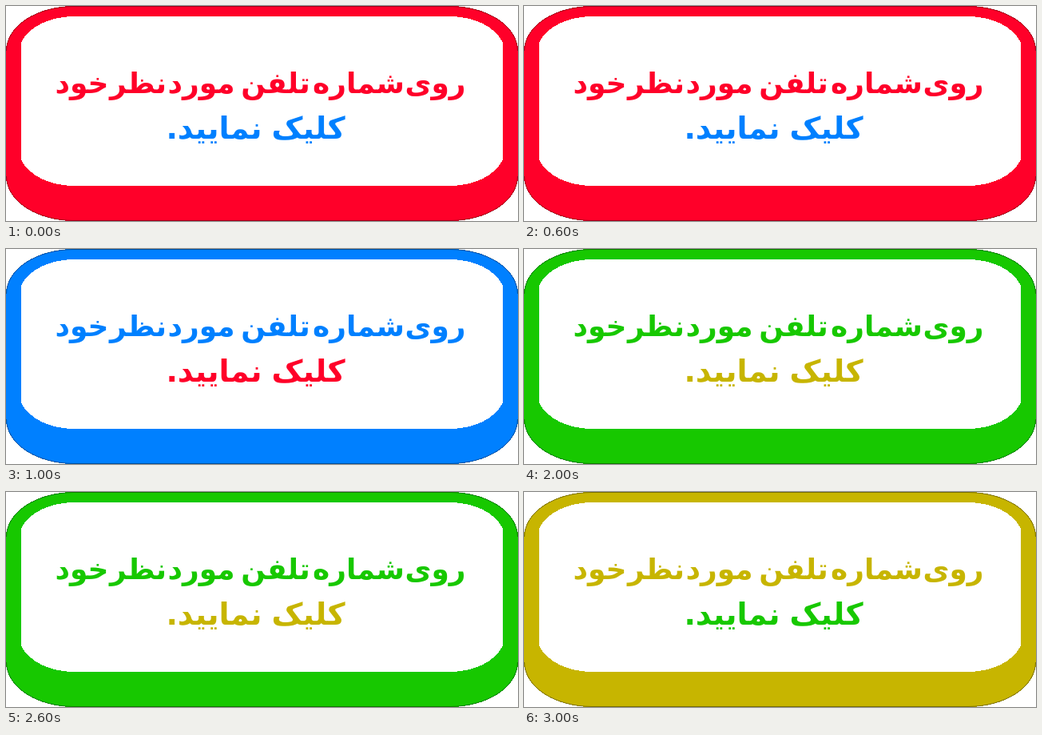
Recreate the animation shown at these times as an HTML page. Size 641 by 269 pixels, loop 4 s.

```html
<!DOCTYPE html>
<html lang="fa">
<head>
<meta charset="utf-8">
<title>کلیک نمایید</title>
<style>
  html, body {
    margin: 0;
    width: 100%;
    height: 100%;
    overflow: hidden;
    background: #fff;
  }
  svg { display: block; width: 641px; height: 269px; }
  text {
    font: bold 36px "DejaVu Sans", sans-serif;
    text-anchor: middle;
    direction: rtl;
  }
  .second { font-size: 38px; }
  .main { animation: main 4s step-end infinite; }
  .accent { animation: accent 4s step-end infinite; }
  .edge { fill: none; stroke: #000; stroke-opacity: .4; }

  @keyframes main {
    0%, 100% { fill: #ff0029; }
    25% { fill: #0080ff; }
    50% { fill: #17c800; }
    75% { fill: #c7b500; }
  }
  @keyframes accent {
    0%, 100% { fill: #0080ff; }
    25% { fill: #ff0029; }
    50% { fill: #c7b500; }
    75% { fill: #17c800; }
  }
</style>
</head>
<body>
<svg viewBox="0 0 641 269">
  <g class="main">
    <rect width="641" height="269" rx="85" ry="56" shape-rendering="crispEdges"/>
    <path class="edge" d="M.5 56A84.5 55.5 0 0 1 85 .5H556A84.5 55.5 0 0 1 640.5 56M640.5 213A84.5 55.5 0 0 1 556 268.5H85A84.5 55.5 0 0 1 .5 213"/>
    <path fill="#fff" shape-rendering="crispEdges" d="M19 46A69 46 0 0 1 85 13H556A69 46 0 0 1 622 46V192A69 46 0 0 1 556 225H85A69 46 0 0 1 19 192Z"/>
    <text x="537.5" y="109">روی</text>
    <text x="441.5" y="109">شماره</text>
    <text x="337.5" y="109">تلفن</text>
    <text x="244.5" y="109">مورد</text>
    <text x="165.5" y="109">نظر</text>
    <text x="95" y="109">خود</text>
  </g>
  <g class="accent">
    <text class="second" x="378.5" y="166">کلیک</text>
    <text class="second" x="260.5" y="166">نمایید.</text>
  </g>
</svg>
</body>
</html>
```
